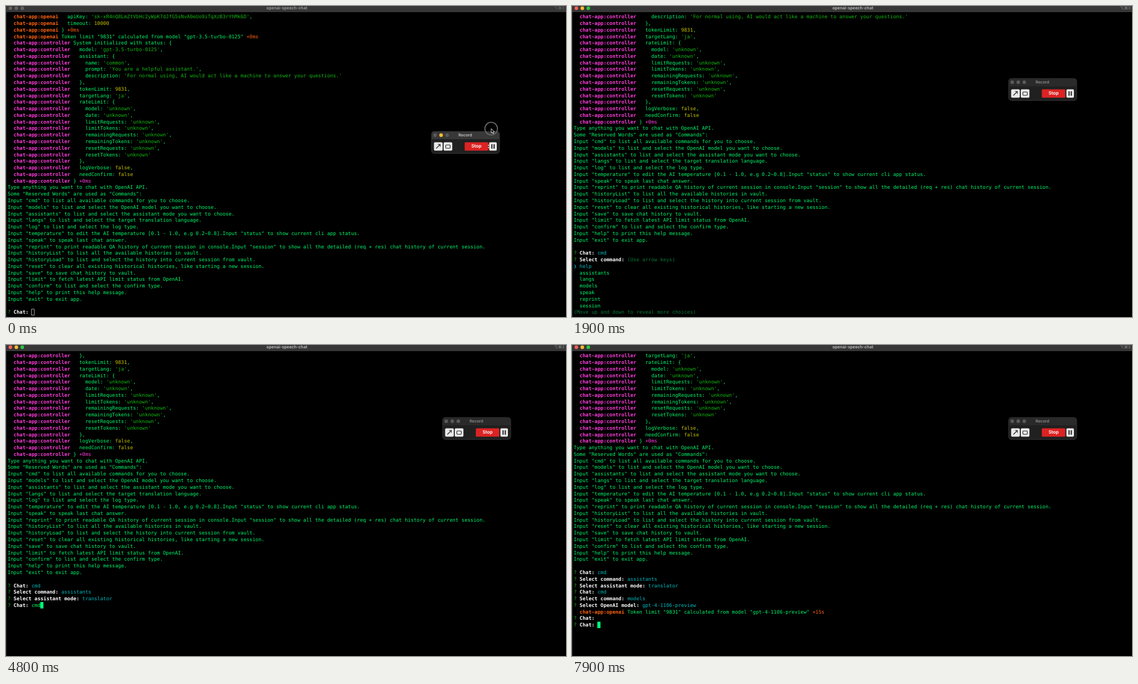
Animation, 1003 px wide and 558 px high, one loop 8 s. Source, as an HTML page with a canvas:

```html
<!DOCTYPE html>
<html lang="en">
<head>
<meta charset="utf-8">
<title>Terminal session</title>
<style>
html, body { margin: 0; width: 100%; height: 100%; overflow: hidden; background: #000; }
canvas { display: block; }
</style>
</head>
<body>
<canvas width="1003" height="558"></canvas>
<script>
const ctx = document.querySelector('canvas').getContext('2d');
const LOOP = 8000, COL = 5.348, ROW = 11.78, LEFT = 2.9, FIRST = 22.2;
const MONO = '8.88px "DejaVu Sans Mono", monospace';
const SANS = 'Inter, sans-serif';
const TEXT = '#00f76c', STRING = '#12b812', VALUE = '#c7c400', CYAN = '#00b9bd';
const DIM = '#077a38', ORANGE = '#ff6410', PINK = '#ff3cdc';

// ---- Terminal content: every line is a list of [text, colour, bold] runs ----
function logLine(name, colour, text) {
  const runs = [[`  chat-app:${name} `, colour, true]];
  const parts = text.split(/('[^']*'|\b(?:true|false|\d+)(?=,?$)|\+\d+m?s$)/);
  parts.forEach((part, i) => {
    const tint = i % 2 === 0 ? TEXT : part[0] === "'" ? STRING : part[0] === '+' ? colour : VALUE;
    runs.push([part, tint]);
  });
  return runs;
}
const api = text => logLine('openai', ORANGE, text);
const control = text => logLine('controller', PINK, text);
const plain = text => [[text, TEXT]];

const boot = [
  ...[
    "  apiKey: 'sk-xR4nQ8LmZtVbHc2yWpK7dJfG5sNvA0eUo9iTqXzB3rYhMk6D',",
    '  timeout: 10000',
    '} +0ms',
    'Token limit "9831" calculated from model "gpt-3.5-turbo-0125" +0ms'
  ].map(api),
  ...`System initialized with status: {
  model: 'gpt-3.5-turbo-0125',
  assistant: {
    name: 'common',
    prompt: 'You are a helpful assistant.',
    description: 'For normal using, AI would act like a machine to answer your questions.'
  },
  tokenLimit: 9831,
  targetLang: 'ja',
  rateLimit: {
    model: 'unknown',
    date: 'unknown',
    limitRequests: 'unknown',
    limitTokens: 'unknown',
    remainingRequests: 'unknown',
    remainingTokens: 'unknown',
    resetRequests: 'unknown',
    resetTokens: 'unknown'
  },
  logVerbose: false,
  needConfirm: false
} +0ms`.split('\n').map(control),
  ...`Type anything you want to chat with OpenAI API.
Some "Reserved Words" are used as "Commands":
Input "cmd" to list all available commands for you to choose.
Input "models" to list and select the OpenAI model you want to choose.
Input "assistants" to list and select the assistant mode you want to choose.
Input "langs" to list and select the target translation language.
Input "log" to list and select the log type.
Input "temperature" to edit the AI temperature [0.1 - 1.0, e.g 0.2~0.8].Input "status" to show current cli app status.
Input "speak" to speak last chat answer.
Input "reprint" to print readable QA history of current session in console.Input "session" to show all the detailed (req + res) chat history of current session.
Input "historyList" to list all the available histories in vault.
Input "historyLoad" to list and select the history into current session from vault.
Input "reset" to clear all existing historical histories, like starting a new session.
Input "save" to save chat history to vault.
Input "limit" to fetch latest API limit status from OpenAI.
Input "confirm" to list and select the confirm type.
Input "help" to print this help message.
Input "exit" to exit app.
`.split('\n').map(plain)
];

// ---- Session script ----
const steps = [], done = [];
let hidden = 0; // lines scrolled off the top

function show(time, live, caret) {
  const tail = [...done, ...live];
  hidden = Math.max(hidden, tail.length - 1);
  steps.push({ time, tail, hidden, caret });
}
const ask = (label, answer = '', colour = CYAN) =>
  [['? ', STRING], [label + ' ', '#fff', true], [answer, colour]];

function type(time, text = '') {
  show(time, [ask('Chat:', text, TEXT)], 8 + text.length);
}
function menu(time, label, items, pick, foot) {
  const list = items.map((item, i) =>
    i === pick ? [['❯ ' + item, CYAN]] : plain('  ' + item));
  show(time, [ask(label, pick ? '' : '(Use arrow keys)', DIM), ...list, ...(foot ? [foot] : [])]);
}

const commands = ['help', 'assistants', 'langs', 'models', 'speak', 'reprint', 'session'];
const modes = ['common', 'commonTranslated', 'commonLang', 'translator', 'grammar', 'chat', 'chatTranslated'];
const models = ['gpt-3.5-turbo-0125', 'gpt-4-1106-preview', 'gpt-4', 'gpt-4-32k'];
const about = [
  'For normal using, AI would act like a machine to answer your questions.',
  'For normal using, AI would answer your questions with a translation.',
  'For normal using, AI would answer your questions in target language.',
  'AI would act like a translator to translate your words.'
];
const more = [['(Move up and down to reveal more choices)', DIM]];
const pickCommand = (time, pick) => menu(time, 'Select command:', commands, pick, more);
const pickMode = (time, pick) => menu(time, 'Select assistant mode:', modes, pick, plain(about[pick]));
const pickModel = (time, pick) => menu(time, 'Select OpenAI model:', models, pick);

type(0);
type(1400, 'c');
type(1500, 'cm');
type(1600, 'cmd');
done.push(ask('Chat:', 'cmd'));
pickCommand(1800, 0);
pickCommand(2400, 1);
done.push(ask('Select command:', 'assistants'));
pickMode(2700, 0);
pickMode(3300, 1);
pickMode(3700, 2);
pickMode(3900, 3);
done.push(ask('Select assistant mode:', 'translator'));
type(4200);
type(4600, 'c');
type(4700, 'cm');
type(4800, 'cmd');
done.push(ask('Chat:', 'cmd'));
pickCommand(5000, 0);
pickCommand(5300, 1);
pickCommand(5500, 2);
pickCommand(5600, 3);
done.push(ask('Select command:', 'models'));
pickModel(6000, 0);
pickModel(6400, 1);
done.push(ask('Select OpenAI model:', 'gpt-4-1106-preview'),
  api('Token limit "9831" calculated from model "gpt-4-1106-preview" +15s'));
type(7000);
done.push(ask('Chat:'));
type(7600);

// ---- Drawing ----
function box(x, y, w, h, r, fill, stroke, line = 1) {
  ctx.beginPath();
  ctx.roundRect(x, y, w, h, r);
  if (fill) { ctx.fillStyle = fill; ctx.fill(); }
  if (stroke) { ctx.strokeStyle = stroke; ctx.lineWidth = line; ctx.stroke(); }
}
function dot(x, y, r, fill) {
  ctx.beginPath();
  ctx.arc(x, y, r, 0, 7);
  ctx.fillStyle = fill;
  ctx.fill();
}
function path(points, colour, line) {
  ctx.beginPath();
  for (let i = 0; i < points.length; i += 2) ctx.lineTo(points[i], points[i + 1]);
  ctx.strokeStyle = colour;
  ctx.lineWidth = line;
  ctx.stroke();
}
function label(text, x, y, size, weight, colour, align = 'center') {
  ctx.font = `${weight} ${size}px ${SANS}`;
  ctx.textAlign = align;
  ctx.fillStyle = colour;
  ctx.fillText(text, x, y);
}

function drawLine(runs, row) {
  let col = 0;
  ctx.textAlign = 'left';
  for (const [text, colour, bold] of runs) {
    ctx.font = (bold ? 'bold ' : '') + MONO;
    ctx.fillStyle = colour;
    for (const ch of text) {
      if (ch !== ' ') ctx.fillText(ch, LEFT + col * COL, FIRST + row * ROW);
      col++;
    }
  }
}

function drawTerminal(t, active) {
  const step = steps.findLast(s => s.time <= t);
  const lines = [...boot, ...step.tail].slice(step.hidden);
  lines.forEach(drawLine);
  if (step.caret !== undefined) {
    const x = LEFT + step.caret * COL, y = FIRST + (lines.length - 1) * ROW - 8.7;
    if (active) box(x - .3, y, 5.6, 11.5, 0, '#00ff78');
    else box(x, y + .3, 5, 10.8, 0, null, '#b8c4bb', .9);
  }
  box(0, 0, 1, 558, 0, '#292929');
  box(0, 0, 1003, 11, 0, '#373737');
  const lights = active ? ['#ff5f57', '#febc2e', '#28c840'] : Array(3).fill('#626262');
  lights.forEach((c, i) => dot(7.8 + i * 10.7, 4, 3.2, c));
  label('openai-speech-chat', 503, 6.4, 7.4, 600, active ? '#c4c4c4' : '#a4a4a4');
  label('⌥⌘3', 1000, 6, 7, 400, active ? '#969696' : '#747474', 'right');
}

function drawRecorder(x, y, active) {
  ctx.save();
  ctx.translate(x, y);
  box(.5, .5, 122, 39.5, 5, '#202020', '#3e3e3e', .8);
  box(1, 1, 121, 13.5, [5, 5, 0, 0], active ? '#383838' : '#2a2a2a');
  for (let i = 0; i < 3; i++)
    dot(7 + i * 10.8, 7.2, 3.2, active && i === 1 ? '#febc2e' : '#5a5a5a');
  label('Record', 61, 9.6, 7.2, 600, active ? '#c4c4c4' : '#8c8c8c');
  box(5, 20, 15.5, 15, 2, '#e9e9e9');
  path([9, 31, 16, 24], '#222', 1.2);
  path([12, 23.8, 16.2, 23.8, 16.2, 28], '#222', 1.1);
  box(22.3, 20, 15.5, 15, 2, '#e9e9e9');
  box(26, 24.7, 8, 6, 1.4, null, '#222', 1.1);
  box(60, 20, 42, 15, 1.5, '#dc2323');
  label('Stop', 81, 29.9, 8.2, 600, '#fff');
  if (active) {
    box(102, 20, 2, 15, 0, '#8c1919');
    dot(102.7, 25.5, .9, '#fff');
    dot(102.7, 29.5, .9, '#fff');
  }
  box(104, 20, 13.5, 15, 2, '#e9e9e9');
  box(107.8, 23.5, 2, 8, .4, '#222');
  box(111.8, 23.5, 2, 8, .4, '#222');
  ctx.restore();
}

function drawPointer(x, y, pressed, beam) {
  ctx.save();
  ctx.translate(x, y);
  if (beam) {
    path([-2, -4.5, 0, -3.8, 2, -4.5], '#ddd', 1);
    path([0, -4, 0, 4], '#ddd', 1.2);
    path([-2, 4.5, 0, 3.8, 2, 4.5], '#ddd', 1);
    path([-1.3, 1, 1.3, 1], '#ddd', .8);
  } else {
    if (pressed) {
      ctx.beginPath();
      ctx.arc(0, 0, 11.3, 0, 7);
      ctx.strokeStyle = '#686868';
      ctx.lineWidth = 1.8;
      ctx.stroke();
    }
    const arrow = new Path2D('M0 0V8L1.9 6.3 3.1 9 4.5 8.4 3.3 5.8H5.8Z');
    ctx.fillStyle = '#000';
    ctx.fill(arrow);
    ctx.strokeStyle = '#eee';
    ctx.lineWidth = .9;
    ctx.stroke(arrow);
  }
  ctx.restore();
}

const mix = (a, b, p) => a + (b - a) * p;
function ease(t, from, to) {
  const p = Math.min(1, Math.max(0, (t - from) / (to - from)));
  return p * p * (3 - 2 * p);
}

function draw(now) {
  const t = Math.floor(now % LOOP / 100) * 100;
  const active = t >= 800;
  ctx.textRendering = 'geometricPrecision';
  ctx.fillStyle = '#000';
  ctx.fillRect(0, 0, 1003, 558);
  drawTerminal(t, active);

  const drag = ease(t, 0, 500), leave = ease(t, 500, 800);
  drawRecorder(mix(761.5, 781.5, drag), mix(224.5, 129.5, drag), !active);
  if (t < 1400) {
    const x = mix(mix(869, 889, drag), 725, leave);
    const y = mix(mix(220, 134, drag), 277, leave);
    drawPointer(x, y, t < 500, t >= 600);
  }
}

const start = performance.now();
function tick() {
  draw(performance.now() - start);
  requestAnimationFrame(tick);
}
tick();
</script>
</body>
</html>
```
